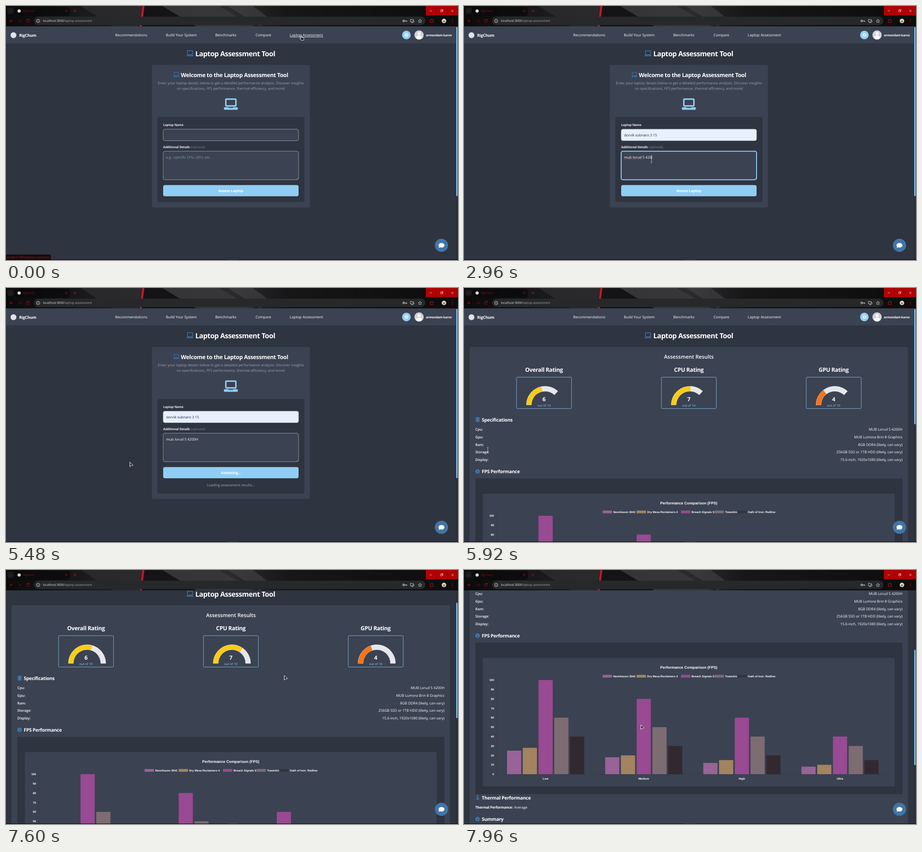
An HTML page that plays this animation: 998 px wide and 561 px high, repeating every 8000 ms.

```html
<!DOCTYPE html>
<html lang="en">
<head>
<meta charset="utf-8">
<title>Laptop Assessment</title>
<style>
html, body { margin: 0; width: 100%; height: 100%; overflow: hidden; background: #2e3440; }
svg { display: block; width: 100vw; height: 100vh; }
text { font-family: "Open Sans", "Noto Sans", sans-serif; text-rendering: geometricPrecision; white-space: pre; }
.b { font-weight: 700; letter-spacing: -.03em; }
.s { font-weight: 600; }
.chart text { font-family: "Liberation Sans", Arial, sans-serif; font-weight: 700; }
</style>
</head>
<body>
<svg id="stage" viewBox="0 0 998 561" preserveAspectRatio="none" xmlns="http://www.w3.org/2000/svg"></svg>
<script>
const LOOP = 8000;
const BG = '#2e3440', CARD = '#3b4252', SKY = '#90cdf4', BLUE = '#3f76aa', MUTED = '#9aa2af', RED = '#9c0d14';
const NAME = 'dorvik subnaro 3 15', DETAILS = 'mub lorud 5 4200H';
const APPEAR = 5560, CLICK = 3680, FILL = 1040, SWITCH = 1800;

const text = (x, y, s, size, { fill = '#fff', cls = '', anchor = 'start', id = '' } = {}) =>
  `<text ${id && `id="${id}"`} x="${x}" y="${y}" font-size="${size}" fill="${fill}" class="${cls}" text-anchor="${anchor}">${s}</text>`;
const mid = (x, y, s, size, o = {}) => text(x, y, s, size, { anchor: 'middle', ...o });
const end = (x, y, s, size, o = {}) => text(x, y, s, size, { anchor: 'end', ...o });
const rect = (x, y, w, h, fill, rx = 0, more = '') =>
  `<rect x="${x}" y="${y}" width="${w}" height="${h}" fill="${fill}" rx="${rx}" ${more}/>`;
const circle = (x, y, r, fill, more = '') => `<circle cx="${x}" cy="${y}" r="${r}" fill="${fill}" ${more}/>`;
const line = (d, stroke, w = 1, more = '') =>
  `<path d="${d}" fill="none" stroke="${stroke}" stroke-width="${w}" ${more}/>`;

function laptop(cx, y, w, h, base, sw, color) {
  const sx = cx - w * .41 + sw / 2;
  return rect(sx, y + sw / 2, w * .82 - sw, h - base - sw - sw * .4, 'none', sw * .5, `stroke="${color}" stroke-width="${sw}"`) +
    rect(cx - w / 2, y + h - base, w, base, color, base * .45) +
    rect(cx - w * .16, y + h - base, w * .32, base * .28, CARD);
}

const infoIcon = (x, y) => circle(x, y, 5, BLUE) + circle(x, y - 2.2, .8, CARD) + rect(x - .7, y - .8, 1.4, 3.6, CARD);

function nav() {
  const items = [[241, 'Recommendations'], [353, 'Build Your System'], [462, 'Benchmarks'], [551, 'Compare'], [626.5, 'Laptop Assessment']];
  return rect(0, 45, 993, 37.5, CARD) + circle(16.5, 64.5, 6.5, '#dfe3e8') +
    text(29, 67.7, 'RigChum', 8.9, { cls: 'b' }) +
    items.map(([x, s]) => text(x, 67, s, 8.08)).join('') +
    `<g id="underline">${line('M626.5 68.6H700.5', '#fff', .8)}</g>` +
    circle(884, 64, 9.5, SKY) + circle(884, 64, 2.4, 'none', 'stroke="#fff" stroke-width="1.3"') +
    circle(884, 64, 4.2, 'none', 'stroke="#fff" stroke-width="1.5" stroke-dasharray="1.5 1.8"') +
    circle(912, 64, 10.3, '#cfd1d4') + circle(912, 61, 3.5, '#fafafa') +
    '<path d="M905 70.5q0-5 7-5t7 5a10 10 0 0 1-14 0z" fill="#fafafa"/>' +
    text(927, 66.6, 'armondam karvo', 6.95, { cls: 'b' });
}

function form() {
  return rect(322, 130, 349, 315, CARD, 4, 'id="card"') +
    laptop(376, 146, 12.5, 10.8, 1.8, 1.1, BLUE) +
    text(386, 156.6, 'Welcome to the Laptop Assessment Tool', 12.5, { cls: 'b' }) +
    mid(496.5, 173, 'Enter your laptop details below to get a detailed performance analysis. Discover insights', 7.88, { fill: MUTED }) +
    mid(496.5, 185.4, 'on specifications, FPS performance, thermal efficiency, and more!', 7.88, { fill: MUTED }) +
    laptop(496.5, 204, 31, 25.2, 5.6, 3.2, SKY) +
    rect(334, 245, 325, 188, BG, 4, 'id="panel"') +
    text(347, 265, 'Laptop Name', 6.98, { cls: 'b', fill: '#e6e9ee' }) +
    rect(347, 272, 299, 25.5, CARD, 4, 'id="nameBox"') +
    text(353.5, 287.7, '', 7.85, { id: 'nameText', fill: '#23272f' }) +
    text(347, 313.8, 'Additional Details', 7.03, { cls: 'b', fill: '#e6e9ee' }) +
    text(408, 313.8, '(optional)', 7.15, { fill: '#7d8593' }) +
    rect(347, 320.7, 299, 63, CARD, 4, 'id="moreBox"') +
    line('M641.5 382.5l3-3M643.5 382.5l1.2-1.2', '#a9b1bd', .5) +
    text(353.2, 336.7, 'e.g., specific CPU, GPU, etc.', 7.9, { id: 'hint', fill: '#8f97a5' }) +
    text(353.5, 336.7, '', 7.85, { id: 'moreText' }) +
    line('', '#d0323c', .9, 'id="squiggle" stroke-dasharray="1.6 .6"') +
    line('', '#fff', .8, 'id="caret"') +
    rect(347, 395.5, 299, 24.7, SKY, 4) +
    mid(496.3, 411, '', 8.25, { cls: 'b', id: 'button' }) +
    mid(496.5, 438, 'Loading assessment results...', 7.75, { id: 'loading', fill: '#a4abb6' });
}

const RATINGS = [['Overall', 6, '#facc15'], ['CPU', 7, '#facc15'], ['GPU', 4, '#f97316']];
const ratingX = i => 176.6 + 319.8 * i;

function ratings() {
  return RATINGS.map(([name, score, color], i) => {
    const x = ratingX(i);
    return mid(x, 185.3, name + ' Rating', 12.5, { cls: 'b' }) +
      rect(x - 60.5, 197, 121.3, 69.3, CARD, 2, `stroke="${SKY}" stroke-width=".8"`) +
      `<path id="done${i}" fill="${color}" stroke="#fff" stroke-width=".5"/>` +
      `<path id="rest${i}" fill="#e5e7eb" stroke="#fff" stroke-width=".5"/>` +
      mid(x, 250.3, score, 12.3, { cls: 'b' }) + mid(x, 262.4, 'out of 10', 7.05, { fill: SKY });
  }).join('');
}

const SPECS = [['Cpu', 'MUB Lorud 5 4200H'], ['Gpu', 'MUB Lumora Brin 8 Graphics'], ['Ram', '8GB DDR4 (likely, can vary)'],
  ['Storage', '256GB SSD or 1TB HDD (likely, can vary)'], ['Display', '15.6-inch, 1920x1080 (likely, can vary)']];
const GAMES = [['Neonhaven 3042', 306, '#986397'], ['Dry Mesa Reclaimers 4', 381, '#a38360'], ['Breach Signals 5', 479, '#984a93'],
  ['Towerkin', 553, '#7d6c71'], ['Oath of Iron: Redline', 603, '#322930']];
const FPS = { Low: [25, 28, 100, 60, 40], Medium: [18, 20, 80, 50, 30], High: [12, 15, 60, 40, 20], Ultra: [8, 10, 40, 30, 15] };
const ZERO = 711, UNIT = 2.08;

function chart() {
  let out = rect(25, 420.5, 943, 334.5, BG) + rect(41.5, 454, 909.5, 284.3, CARD, 4) +
    mid(496.3, 478.4, 'Performance Comparison (FPS)', 8.35);
  GAMES.forEach(([name, x, color], i) => {
    out += rect(x, 491.6, 20.8, 6, i === 4 ? '#323640' : color) + text(x + 23.6, 496.7, name, 6.2);
  });
  for (let v = 0; v <= 100; v += 10) out += end(66.3, ZERO + 2.2 - v * UNIT, v, 6.24);
  out += line(`M72 503V${ZERO}H938`, 'rgba(0,0,0,.16)', .6);
  Object.entries(FPS).forEach(([level, values], g) => {
    values.forEach((v, i) => {
      out += rect(95 + 216.7 * g + 34.75 * i, ZERO - v * UNIT, 31.3, v * UNIT, GAMES[i][2], 0, `class="bar" data-v="${v}"`);
    });
    out += mid(180 + 216.7 * g, 722.5, level, 6.24);
  });
  return `<g class="chart">${out}</g>`;
}

function results() {
  const heading = (y, s) => text(39.3, y, s, 10.45, { cls: 'b' });
  return rect(12.3, 130, 968, 800, CARD, 4) + mid(496.5, 156.4, 'Assessment Results', 11.55, { cls: 's' }) + ratings() +
    rect(27, 285.5, 6.4, 10.5, BLUE, 1) + line('M25.7 286v10M34.6 286v10', BLUE, 1.6, 'stroke-dasharray="1.2 1"') +
    heading(294.7, 'Specifications') +
    SPECS.map(([k, v], i) => text(25, 315.3 + 16.6 * i, k + ':', 7.75, { cls: 's' }) + end(968, 315.3 + 16.6 * i, v, 7.9)).join('') +
    infoIcon(30, 405) + heading(409, 'FPS Performance') + chart() +
    line('M30 758.5v7', BLUE, 3.2, 'stroke-linecap="round"') + circle(30, 765, 2.6, BLUE) + line('M30 760v5', CARD, .8) +
    heading(766.8, 'Thermal Performance') +
    text(25, 787.2, 'Thermal Performance:', 7.83, { cls: 'b' }) + text(110.5, 787.2, 'Average', 7.85) +
    infoIcon(30, 810) + heading(814.4, 'Summary');
}

function browser() {
  const dots = [-3, 0, 3].map(d => circle(986, 33 + d, .9, RED)).join('');
  return rect(0, 0, 998, 45, 'url(#theme)') +
    '<path d="M165 0H300L292 45H235z" fill="#303033" opacity=".65"/>' +
    '<path d="M306 0H345L420 45H300z" fill="#141416"/>' +
    '<path d="M345 0H470L548 45H420z" fill="#3c3c3f" opacity=".7"/>' +
    '<path d="M490 0H545L585 30L560 45z" fill="#4a4a4d" opacity=".5"/>' +
    '<path d="M301 0h4.500l-6 45h-4.500z" fill="#c3182a"/>' +
    rect(20, 2, 121, 20, '#0a0a0b', 5, 'opacity=".75"') + rect(3, 3.500, 14, 14, '#19191b', 4) + rect(145, 4, 13, 13, '#19191b', 5) +
    line('M8 10l2.300 2.300L12.600 10', RED, 1) + circle(29, 11, 3.600, '#d9d9d9') +
    text(37.500, 13.200, 'RigChum', 6.100, { fill: RED }) +
    line('M131 8.800l4 4m0-4l-4 4M149.500 10.800h5m-2.500-2.500v5', '#b31019', 1) +
    rect(62, 23.500, 864, 18.500, '#26282a', 9.2) +
    line('M15 33H9m2.800-2.800L9 33l2.800 2.800', RED, 1.1) + line('M28 33h6m-2.800-2.800L34 33l-2.800 2.800', '#5c1014', 1) +
    line('M51 31a3.300 3.300 0 1 0 .5 2.800M51.500 29v2.500H49', RED, 1.1) +
    circle(71, 33, 3.600, 'none', 'stroke="#e3e3e3" stroke-width=".9"') + line('M71 32.500v2.300M71 30.800v.8', '#e3e3e3', .9) +
    text(81.500, 35.400, 'localhost:3000<tspan fill="#a5a7aa">/laptop-assessment</tspan>', 6.830, { fill: '#e8e8e8' }) +
    circle(878, 33, 1.900, 'none', 'stroke="#ddd" stroke-width="1.100"') + line('M880 33h5v1.800M883 33v1.500', '#ddd', 1.1) +
    line('M897 29.500h-4v5.500h8v-2M895 36.800h4M899 28.800v4m-1.800-1.600l1.800 1.800 1.800-1.800', '#ddd', .9) +
    line('M914 29.300l1.100 2.500 2.700.3-2 1.800.6 2.700-2.400-1.400-2.400 1.400.6-2.700-2-1.800 2.700-.3z', '#ddd', .8) +
    line('M937 30.500h2a1 1 0 0 1 2.400 0h2v6h-6.400z', '#b31019', 1.1) +
    circle(967, 33, 5, '#d8d2b8') + circle(967, 34, 2.300, '#8f835f') + dots +
    rect(927, 0, 71, 20.500, '#b00205') + line('M950 0V20.500M974 0V20.500', '#8d0204', .8) +
    line('M935.500 10.800h5M983.500 8.500l4.500 4.500m0-4.500l-4.500 4.500M959.800 9.300h3.800v3.600h-3.800zM961 9V8h3.800v3.600h-1', '#f4dede', .8);
}

const stage = document.getElementById('stage');
stage.innerHTML = `<defs>
  <linearGradient id="theme"><stop offset="0" stop-color="#0a0a0b"/><stop offset=".2" stop-color="#1c1c1e"/>
  <stop offset=".5" stop-color="#2b2b2d"/><stop offset=".62" stop-color="#171718"/><stop offset="1" stop-color="#0c0c0d"/></linearGradient>
  <clipPath id="view"><rect y="45" width="998" height="515"/></clipPath></defs>` +
  rect(0, 0, 998, 561, BG) +
  `<g clip-path="url(#view)"><g id="page">${nav()}${laptop(406.3, 98, 15.4, 12.800, 2, 1.4, BLUE)}
  ${text(418, 110.700, 'Laptop Assessment Tool', 15.55, { cls: 'b' })}<g id="form">${form()}</g><g id="results">${results()}</g></g></g>` +
  rect(993, 45, 5, 515, '#2b303b') + rect(994, 46, 3, 374, '#7dbdea', 1.500, 'id="thumb"') +
  circle(961.500, 528.500, 14.600, '#4275a6') +
  '<path d="M961.500 523.500c3.700 0 6.500 2.300 6.500 5s-2.800 5-6.500 5c-1 0-2-.2-2.900-.5-1 .7-2.300 1.100-3.600 1.100.8-.8 1.200-1.700 1.300-2.500-.8-.9-1.300-1.900-1.300-3.100 0-2.700 2.800-5 6.500-5z" fill="#fff"/>' +
  rect(0, 560, 998, 1, '#050506') + rect(488, 560, 25, 1, '#4a1014') + browser() +
  `<g id="status"><path d="M0 549H96q3 0 3 3V560H0z" fill="#150c0e"/>${text(2.300, 556.800, 'localhost:3000/laptop-assessment', 5.900, { fill: '#c4141e' })}</g>` +
  `<g id="cursor" stroke-linejoin="round">
  <path id="arrow" d="M0 0V10L2.800 7.500L7 7Z" fill="#1c1d22" stroke="#fff"/>
  <path id="hand" d="M0 .5q1-1 1.800 0V4.500l3.800.8q1.400.4 1.200 1.800L6 10.500H1L-2 7q0-1.500 2 0z" fill="#1c1d22" stroke="#fff" stroke-width=".9"/>
  <path id="beam" d="M-1.800-6H-.4L0-5.600.4-6H1.800M0-5.600V5.600M-1.800 6H-.4L0 5.600.4 6H1.800" fill="none" stroke="#d5d8dd" stroke-width=".8"/></g>`;

const $ = id => document.getElementById(id);
const bars = [...stage.querySelectorAll('.bar')];
const show = (id, on) => $(id).setAttribute('display', on ? 'inline' : 'none');
const set = (id, attrs) => { for (const k in attrs) $(id).setAttribute(k, attrs[k]); };
const part = (t, a, b) => Math.min(1, Math.max(0, (t - a) / (b - a)));
const smooth = u => u * u * (3 - 2 * u);

// CSS "ease": cubic-bezier(.25, .1, .25, 1)
function ease(x) {
  let lo = 0, hi = 1;
  for (let i = 0; i < 20; i++) {
    const s = (lo + hi) / 2;
    const bx = .75 * s * (1 - s) ** 2 + .75 * s * s * (1 - s) + s ** 3;
    if (bx < x) lo = s; else hi = s;
  }
  return .3 * lo * (1 - lo) ** 2 + 3 * lo * lo * (1 - lo) + lo ** 3;
}

// Ring sector; a and b run from 0 (left) over the top to 1 (right).
function sector(cx, cy, a, b, R = 41.3, r = 30.2) {
  const p = (q, u) => `${cx - q * Math.cos(u * Math.PI)} ${cy - q * Math.sin(u * Math.PI)}`;
  return `M${p(R, a)}A${R} ${R} 0 0 1 ${p(R, b)}L${p(r, b)}A${r} ${r} 0 0 0 ${p(r, a)}Z`;
}

// time, x, y, shape until the next stop
const PATH = [[0, 651, 65, 'hand'], [280, 651, 65, 'arrow'], [640, 424, 285, 'beam'], [840, 424, 285, 'arrow'],
  [1040, 434, 317, 'arrow'], [1400, 434, 317, 'arrow'], [1700, 414, 340, 'beam'], [3160, 414, 340, 'arrow'],
  [3520, 490, 401, 'hand'], [4500, 490, 401, 'arrow'], [5250, 273.5, 384.700, 'arrow'], [5540, 273.5, 384.700, 'arrow'],
  [5880, 52.5, 358, 'beam'], [6100, 52.5, 358, 'arrow'], [6550, 190, 240, 'arrow'], [6950, 480, 240, 'arrow'],
  [7300, 614.5, 233, 'arrow'], [7640, 614.5, 233, 'arrow'], [7940, 390.5, 342, 'arrow'], [LOOP, 390.5, 342, 'arrow']];

function moveCursor(t) {
  const i = PATH.findIndex((_, k) => k + 1 < PATH.length && t < PATH[k + 1][0]);
  const [t0, x0, y0, shape] = PATH[i], [t1, x1, y1] = PATH[i + 1];
  const u = smooth(part(t, t0, t1));
  set('cursor', { transform: `translate(${x0 + (x1 - x0) * u} ${y0 + (y1 - y0) * u})` });
  ['arrow', 'hand', 'beam'].forEach(s => show(s, s === shape));
}

function updateForm(t) {
  const filled = t >= FILL, inName = t >= 700 && t < SWITCH, inMore = t >= SWITCH && t < CLICK, busy = t >= CLICK;
  const typed = Math.min(DETAILS.length, Math.max(0, Math.floor((t - 2000) / 62)));
  const frame = on => ({ stroke: on ? SKY : '#a9b4c2', 'stroke-width': on ? 2 : .8 });
  set('nameBox', { fill: filled ? '#e8f0fe' : CARD, ...frame(inName) });
  set('moreBox', frame(inMore));
  $('nameText').textContent = filled ? NAME : '';
  $('moreText').textContent = DETAILS.slice(0, typed);
  show('hint', typed === 0);
  show('loading', busy);
  $('button').textContent = busy ? 'Assessing...' : 'Assess Laptop';
  set('card', { height: busy ? 336 : 315 });
  set('panel', { height: busy ? 209 : 188 });

  const field = $(inName ? 'nameText' : 'moreText');
  const x = 353.9 + (field.textContent ? field.getComputedTextLength() : 0);
  const y = inName ? 280 : 329;
  set('caret', { d: `M${x} ${y}v9.6`, stroke: inName && filled ? '#23272f' : '#fff' });
  show('caret', inName || inMore);
  const marked = typed > 9 ? 9 : typed > 3 ? 3 : 0;
  show('squiggle', inMore && marked);
  if (inMore && marked) set('squiggle', { d: `M353.5 338.6h${$('moreText').getSubStringLength(0, marked)}` });
}

function updateResults(t) {
  const sweep = ease(part(t, 5700, 6200));
  RATINGS.forEach(([, score], i) => {
    const x = ratingX(i) + 2.4, cut = sweep * score / 10;
    set('done' + i, { d: sector(x, 258.2, 0, cut) });
    set('rest' + i, { d: sector(x, 258.2, cut, sweep) });
  });
  const grow = 1 - (1 - part(t, APPEAR, 5890)) ** 4;
  bars.forEach(bar => {
    const h = bar.dataset.v * UNIT * grow;
    bar.setAttribute('y', ZERO - h);
    bar.setAttribute('height', h);
  });
}

function draw(t) {
  const done = t >= APPEAR;
  const scroll = 52 * smooth(part(t, 7400, 7540)) + 208 * smooth(part(t, 7630, 7810));
  set('page', { transform: `translate(0 ${-scroll})` });
  set('thumb', { y: 46 + scroll / 2, height: done ? 255 : 374 });
  show('form', !done);
  show('results', done);
  show('underline', t < 320);
  show('status', t < 480);
  if (done) updateResults(t); else updateForm(t);
  moveCursor(t);
}

const start = performance.now();
function tick() {
  draw((performance.now() - start) % LOOP);
  requestAnimationFrame(tick);
}
tick();
</script>
</body>
</html>
```
